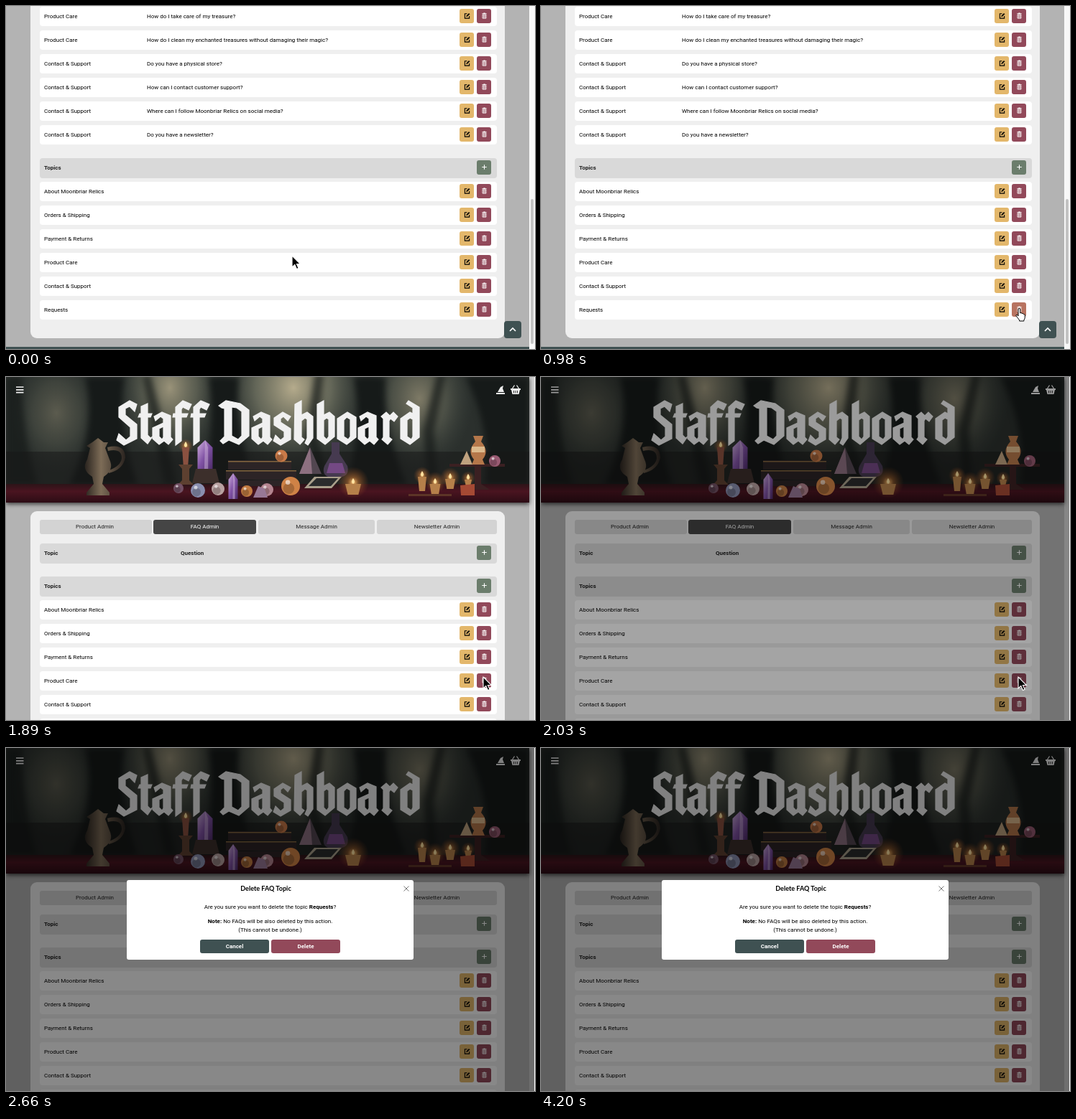
An HTML page that plays this animation: 736 by 478 pixels, repeating every 4270 ms.

```html
<!DOCTYPE html>
<html lang="en">
<head>
<meta charset="utf-8">
<title>Staff Dashboard</title>
<style>
  html, body { margin: 0; width: 100%; height: 100%; overflow: hidden; }
  body { background: #fff; }
  #stage { position: relative; width: 736px; height: 478px; overflow: hidden; font: 8px/28px Roboto, sans-serif; color: #000; }
  #stage *, #stage { box-sizing: border-box; }
  #stage div, #stage span, #stage > svg, .page > svg { position: absolute; white-space: nowrap; }
  .page { inset: 0; background: #b3b3b3; }
  .card { left: 34px; width: 660px; background: #efefef; border-radius: 9px; }
  .row { left: 47px; width: 636px; height: 27px; background: #fff; border-radius: 4px; }
  .row.head { height: 28px; background: #d9d9d9; font-weight: 700; color: #222; }
  .row span { left: 6px; top: 0; }
  .row .q { left: 149px; }
  .row.head .q { left: 196px; }
  .btn { top: 3px; left: 608px; width: 20px; height: 20px; border-radius: 3px; background: #92495a; color: #fff; }
  .btn.edit { left: 584px; background: #e3b76b; color: #000; }
  .btn.add { background: #6b7d6c; }
  .btn svg { position: absolute; left: 5.5px; top: 5px; width: 9px; height: 9px; fill: none; stroke: currentColor; }
  .tab { top: 199px; height: 20px; line-height: 20px; text-align: center; background: #d3d3d3; border-radius: 3px; color: #222; }
  .tab.on { background: #454545; color: #fff; }
  .top { left: 693px; top: 439px; width: 24px; height: 24px; border-radius: 4px; background: #3f5152; }
  .bar { left: 728px; top: 0; width: 8px; height: 478px; background: #f7f7f7; }
  .bar div { left: 1.5px; top: 269px; width: 4px; height: 202px; border-radius: 2px; background: #c2c2c2; }
  .foot { left: 0; top: 475px; width: 728px; height: 3px; background: #3f5152; }
  .gutter { left: 728px; top: 0; width: 8px; height: 478px; background: #d0d0d0; border-right: 1px solid #fff; }
  .hero { left: 0; top: 0; width: 728px; height: 175px; box-shadow: 0 2px 6px rgba(0, 0, 0, .7); }
  .soft { filter: blur(4px); }
  #shade { left: 0; top: 0; width: 735px; height: 478px; background: #000; }
  #modal { left: 168px; top: 184px; width: 399px; height: 110.5px; border-radius: 3px; background: #fff; text-align: center; }
  #modal .line { left: 0; width: 100%; line-height: 12px; }
  #modal .title { width: 387px; top: 5.5px; font: 700 9.1px/12px Lato, sans-serif; }
  #modal .act { top: 83px; width: 96px; height: 19px; line-height: 19px; border-radius: 3px; color: #fff; font-weight: 700; }
  #cursor { left: 0; top: 0; width: 16px; height: 22px; overflow: visible; }

  #list, #shade, #modal, #cursor, #arrow, #hand, .target { animation: 4270ms infinite linear; }
  #list { animation-name: list; animation-timing-function: step-end; }
  #shade { animation-name: shade; }
  #modal { animation-name: fade, drop; }
  #cursor { animation-name: move, gone; animation-timing-function: linear, step-end; }
  #arrow { animation-name: arrow; animation-timing-function: step-end; }
  #hand { animation-name: hand; animation-timing-function: step-end; }
  .target { animation-name: press; }

  @keyframes list { 0% { visibility: visible } 44.26%, 100% { visibility: hidden } }
  @keyframes shade { 0%, 44.87% { opacity: 0 } 48.38%, 100% { opacity: .465 } }
  @keyframes fade { 0%, 49.65% { opacity: 0 } 53.16%, 100% { opacity: 1 } }
  @keyframes drop {
    0%, 49.65% { transform: translateY(-25px); animation-timing-function: ease-out }
    56.67%, 100% { transform: none }
  }
  @keyframes move {
    0%, 1.64% { transform: translate(398px, 348px); animation-timing-function: ease-in-out }
    22.5%, 100% { transform: translate(664px, 418px) }
  }
  @keyframes gone { 0% { visibility: visible } 55.74%, 100% { visibility: hidden } }
  @keyframes arrow { 0% { opacity: 1 } 21.31% { opacity: 0 } 44.26%, 100% { opacity: 1 } }
  @keyframes hand { 0% { opacity: 0 } 21.31% { opacity: 1 } 44.26%, 100% { opacity: 0 } }
  @keyframes press {
    0%, 21.31% { background: #92495a; box-shadow: 0 0 0 0 #c59ba600 }
    24.82%, 39.34% { background: #e3a468; box-shadow: 0 0 0 0 #c59ba600 }
    40.98%, 100% { background: #c59ba6; box-shadow: 0 0 0 1.5px #c59ba699 }
  }
</style>
</head>
<body>
<div id="stage">
  <div id="dash" class="page">
    <div class="gutter"></div>
    <div class="hero">
      <svg width="728" height="175">
        <defs>
          <radialGradient id="mist"><stop stop-color="#b5ab8c"/><stop offset=".5" stop-color="#777967" stop-opacity=".75"/><stop offset="1" stop-color="#444d46" stop-opacity="0"/></radialGradient>
          <radialGradient id="glow"><stop stop-color="#ffc777"/><stop offset=".35" stop-color="#d07c37" stop-opacity=".5"/><stop offset="1" stop-color="#9a4c24" stop-opacity="0"/></radialGradient>
          <linearGradient id="wood" x2="0" y2="1"><stop stop-color="#2c1418"/><stop offset=".4" stop-color="#4a1420"/><stop offset="1" stop-color="#2c0c15"/></linearGradient>
          <linearGradient id="gem" x2="1" y2="1"><stop stop-color="#d3b4e0"/><stop offset=".5" stop-color="#8153a5"/><stop offset="1" stop-color="#4b2a68"/></linearGradient>
          <linearGradient id="brass"><stop stop-color="#2a241f"/><stop offset=".4" stop-color="#7d6c57"/><stop offset="1" stop-color="#2b2420"/></linearGradient>
        </defs>
        <rect width="728" height="175" fill="#2b302d"/>
        <g fill="url(#mist)">
          <ellipse cx="400" cy="15" rx="105" ry="115"/>
          <ellipse cx="228" cy="15" rx="75" ry="105" opacity=".8"/>
          <ellipse cx="575" cy="30" rx="75" ry="100" opacity=".6"/>
          <ellipse cx="70" cy="50" rx="65" ry="85" opacity=".35"/>
        </g>
        <g class="soft" fill="#161a19">
          <path d="M110 0h55q-12 60 18 150H88Q128 70 110 0zM282 0h42q-8 70 24 150h-78q24-70 12-150zM484 0h44q-6 70 30 150h-86q26-75 12-150zM640 0h88v150h-62q10-75-26-150z"/>
          <path d="M0 0h22q0 80 22 150H0zM200 -5l24 90 14 65h-18L190 0zM430 -5l-14 90 20 65h14l-16-65 8-90zM600 -5l-20 80 8 75h12l-4-75 16-80z" opacity=".7"/>
        </g>
        <rect y="104" width="728" height="46" fill="#171716" opacity=".5"/>
        <rect y="149" width="728" height="26" fill="url(#wood)"/>
        <g id="things"></g>
        <g id="word" fill="#f0f0f0" stroke="#f0f0f0" stroke-width="1.200" fill-rule="evenodd" role="img" aria-label="Staff Dashboard"></g>
        <path d="M14 14h10.500M14 17.800h10.500M14 21.600h10.500" stroke="#eee" stroke-width="1.700"/>
        <g fill="#eee">
          <path d="M682 22h12v2h-12zM684 21l4-7 4-2-1 4 2 5z"/>
          <path d="M702 16h14v2h-1l-1.500 6h-9L703 18h-1z"/>
          <path d="M704.500 16l3-4.500M713.500 16l-3-4.500" stroke="#eee" stroke-width="1.300"/>
        </g>
        <path d="M706.500 19v3.500M709 19v3.500M711.500 19v3.500" stroke="#333"/>
      </svg>
    </div>
    <div class="card" style="top:187px;height:320px"></div>
    <div class="tab" style="left:47px;width:156px;padding-right:3px">Product Admin</div>
    <div class="tab on" style="left:205px;width:143px">FAQ Admin</div>
    <div class="tab" style="left:351px;width:162px">Message Admin</div>
    <div class="tab" style="left:516px;width:167px">Newsletter Admin</div>
  </div>
  <div id="list" class="page">
    <div class="card" style="top:-20px;height:483px"></div>
    <div class="foot"></div>
    <div class="bar"><div></div></div>
    <div class="top"><svg width="24" height="24"><path d="M8 14l4-4 4 4" fill="none" stroke="#fff" stroke-width="1.700"/></svg></div>
  </div>
  <div id="shade"></div>
  <div id="modal">
    <div class="line title">Delete FAQ Topic</div>
    <svg width="8" height="8" style="position:absolute;left:385px;top:8px"><path d="M.5 .5l7 7M7.500 .5l-7 7" stroke="#777"/></svg>
    <div class="line" style="top:31.5px">Are you sure you want to delete the topic <b>Requests</b>?</div>
    <div class="line" style="top:51.5px"><b>Note:</b> No FAQs will be also deleted by this action.</div>
    <div class="line" style="top:63.5px">(This cannot be undone.)</div>
    <div class="act" style="left:102px;background:#3f5152">Cancel</div>
    <div class="act" style="left:201px;background:#92495a">Delete</div>
  </div>
  <svg id="cursor">
    <path id="arrow" d="M0 0v16l3.800-3.500 2.600 6 2.600-1.100-2.600-5.900h5z" fill="#000" stroke="#fff" stroke-width="1.100"/>
    <path id="hand" transform="translate(-4 3)" d="M4 11V2q0-1.600 1.400-1.600T6.800 2v5l1-.4q1.200 0 1.400 1 1.800-.5 2.200 .9 1.900-.2 1.900 1.400v3q0 2-1.400 3.600v1.500H5.600v-1.300Q3 13.600 1 10.600q-.3-1.400 1.200-1.300z" fill="#fff" stroke="#000"/>
  </svg>
</div>
<script>
  const $ = id => document.getElementById(id);
  const add = (el, html) => el.insertAdjacentHTML('beforeend', html);

  const icons = {
    edit: '<path d="M5 2H1.500v7h7V5.500" stroke-width="1.200"/><path d="M4 6.400l.3-1.500L7.800 1.400l1.200 1.200-3.500 3.500z" fill="currentColor" stroke-width=".5"/>',
    del: '<path d="M1.500 2h7M3.700 1.200h2.600" stroke-width="1.200"/><path d="M2.300 3.400h5.400V9H2.300zM4.100 4v4.500M5.900 4v4.500" stroke-width="1"/>',
    add: '<path d="M5 1.400v7.200M1.400 5h7.200" stroke-width="1.200"/>'
  };
  const button = (kind, extra = '') => `<div class="btn ${kind} ${extra}"><svg viewBox="0 0 10 10">${icons[kind]}</svg></div>`;

  function row(page, y, text, question = '', extra) {
    add(page, `<div class="row" style="top:${y - 14}px"><span>${text}</span><span class="q">${question}</span>${button('edit')}${button('del', extra)}</div>`);
  }
  function head(page, y, text, question = '') {
    add(page, `<div class="row head" style="top:${y - 14}px"><span>${text}</span><span class="q">${question}</span>${button('add')}</div>`);
  }

  const shop = 'Moonbriar Relics', care = 'Product Care', contact = 'Contact &amp; Support';
  const faqs = [
    [care, 'How do I take care of my treasure?'],
    [care, 'How do I clean my enchanted treasures without damaging their magic?'],
    [contact, 'Do you have a physical store?'],
    [contact, 'How can I contact customer support?'],
    [contact, `Where can I follow ${shop} on social media?`],
    [contact, 'Do you have a newsletter?']
  ];
  const topics = ['About ' + shop, 'Orders &amp; Shipping', 'Payment &amp; Returns', care, contact, 'Requests'];

  faqs.forEach((f, i) => row($('list'), 15 + i * 33, ...f));
  head($('list'), 226, 'Topics');
  head($('dash'), 246, 'Topic', 'Question');
  head($('dash'), 292, 'Topics');
  topics.forEach((t, i) => {
    row($('list'), 259 + i * 33, t, '', i === 5 ? 'target' : '');
    row($('dash'), 325 + i * 33, t);
  });

  // Blackletter headline
  const glyphs = {
    S: 'M28 38L18 33 3 42v14l16 14v13l-6 5-10-9-3 9 10 7 18-9V66L12 53V44l6-3 7 7z',
    t: 'M4 41l9-4v14h6l-2 5h-4v25l4 4 3-2-7 10-9-8V56H0l2-5h2z',
    a: 'M2 55l11-6 12 5v30l3 3-6 7-6-5-7 5-9-8V71l15-7v-6l-4-3-7 6zM9 72v11l4 4 2-3V69z',
    f: 'M5 51V42l10-9 12 5-4 8-8-4-2 3v6h9l-2 5h-7v33l-8 6V56H1l1-5z',
    D: 'M0 40l10-7 20 4 12 9v36l-14 12-14-6-8 5-4-4 6-6V44l-4-1zM18 42v40l9 5 5-5V48l-7-5z',
    s: 'M24 55l-11-6L1 57v10l14 9v8l-5 4-7-7-3 8 10 6 14-8V72L10 63v-5l4-3 6 6z',
    h: 'M3 38l9-5v20l8-4 8 6v30l-7 10-4-3 3-7V59l-3-2-5 4v23l4 3-6 7-8-7z',
    b: 'M3 38l9-5v20l8-4 7 6v28l-13 11-11-8zM12 60v23l4 4 3-4V59l-3-2z',
    o: 'M0 58l14-9 12 7v28l-13 10-13-8zM9 60v23l6 4 3-4V59l-5-3z',
    r: 'M2 55l7-6 5 5 5-5 6 6-5 7-5-4-2 3v23l4 3-6 7-8-7 2-3V58z',
    d: 'M0 58l13-9 4 2V43l-9-6 3-4 15 9v42l-13 10-13-8zM9 60v23l6 4 2-4V59l-4-2z'
  };
  const spots = [154, 184, 204, 231, 256, 296, 342, 372, 399, 430, 461, 490, 520, 549];
  [...'StaffDashboard'].forEach((c, i) => add($('word'), `<path transform="translate(${spots[i]})" d="${glyphs[c]}"/>`));

  // Tabletop still life
  const shape = (d, fill) => add($('things'), `<path d="${d}" fill="${fill}"/>`);
  const ball = (x, y, r, fill) => add($('things'), `<circle cx="${x}" cy="${y}" r="${r}" fill="${fill}"/>`);
  const stone = (x, y, r, fill) => {
    ball(x, y, r, fill);
    ball(x - r * .2, y + r * .25, r * .6, '#0003');
    ball(x - r * .3, y - r * .4, r * .25, '#fff9');
  };
  const crystal = (x, y, w, h) => {
    shape(`M${x} ${y}l${w / 2} ${h / 4}v${h * .75}h${-w}v${-h * .75}z`, 'url(#gem)');
    shape(`M${x} ${y}l${w / 5} ${h / 4}v${h * .75}h${-w / 4}z`, '#e5cfec66');
  };
  const candle = (x, y, w, h, fill = '#b5804a') => {
    ball(x, y - 2, w, 'url(#glow)');
    shape(`M${x - w / 2} ${y}h${w}l${-w / 6} ${h}h${-w * .67}z`, fill);
    shape(`M${x} ${y - 8}q4 5 0 8q-4-3 0-8z`, '#ffe3a2');
  };

  shape('M112 96l8-5 8-6 8 6h6l-4 8 6 16q7 14-8 24l-2 10 10 12v4h-32v-4l10-12-2-10q-16-10-7-24l4-16zM141 98q24-6 25 14-3 17-23 22v-4q17-6 18-17 0-14-19-10z', 'url(#brass)');
  candle(250, 98, 10, 24, '#8a5140');
  shape('M240 122h20l-5 6v16l6 6h-22l6-6v-16z', '#5d4030');
  crystal(277, 88, 21, 41);
  shape('M264 128h28l5 20h-38z', '#3c2f2b');
  shape('M309 116h88v13h-88zM306 131h98v12h-98zM312 144h80v8h-80z', '#2c2426');
  shape('M309 117h88v1.500h-88zM306 130h98v1.500h-98z', '#84663f');
  stone(383, 110, 8.5, '#c97a48');
  shape('M423 98l16 37h-31z', '#524650');
  shape('M423 98l3 37h-18z', '#8d7080');
  shape('M453 91h11v16l11 17q3 12-7 15h-20q-9-4-5-15l10-17z', '#463a50');
  shape('M450 120h18l4 14h-26z', '#744984');
  shape('M429 139h38l-14 16h-38z', '#aaa08c');
  shape('M432 141h30l-10 11h-31z', '#2b2c2d');
  candle(483, 149, 22, 15);
  [[240, 155, 7, '#725064'], [267, 158, 10, '#8a8fb0'], [295, 156, 9, '#b8a1a1'], [335, 159, 8, '#c17b42'],
   [363, 157, 9, '#b4848f'], [396, 152, 13, '#cf8246']].forEach(s => stone(...s));
  crystal(316, 134, 13, 36);
  shape('M344 168l7-16 9 4 4 12z', '#987896');
  shape('M617 121h77v4h-77zM652 125h9v24l12 8h-34l13-8z', '#3b2022');
  shape('M650 82h14l-3 8q12 13 2 25l3 7h-18l3-7q-10-12 2-25z', '#b5774a');
  shape('M648 97h18v8h-18z', '#dcb98c');
  shape('M641 103l8 19h-17z', '#bfa27f');
  stone(680, 117, 8, '#9a5b73');
  [[579, 139, 12, 20], [597, 149, 15, 15], [618, 142, 14, 14], [643, 143, 10, 8]].forEach(c => candle(...c));
  shape('M632 151l20-2v16h-19z', '#a54a34');
  shape('M560 163h60v3h-60z', '#5d3527');
</script>
</body>
</html>
```
